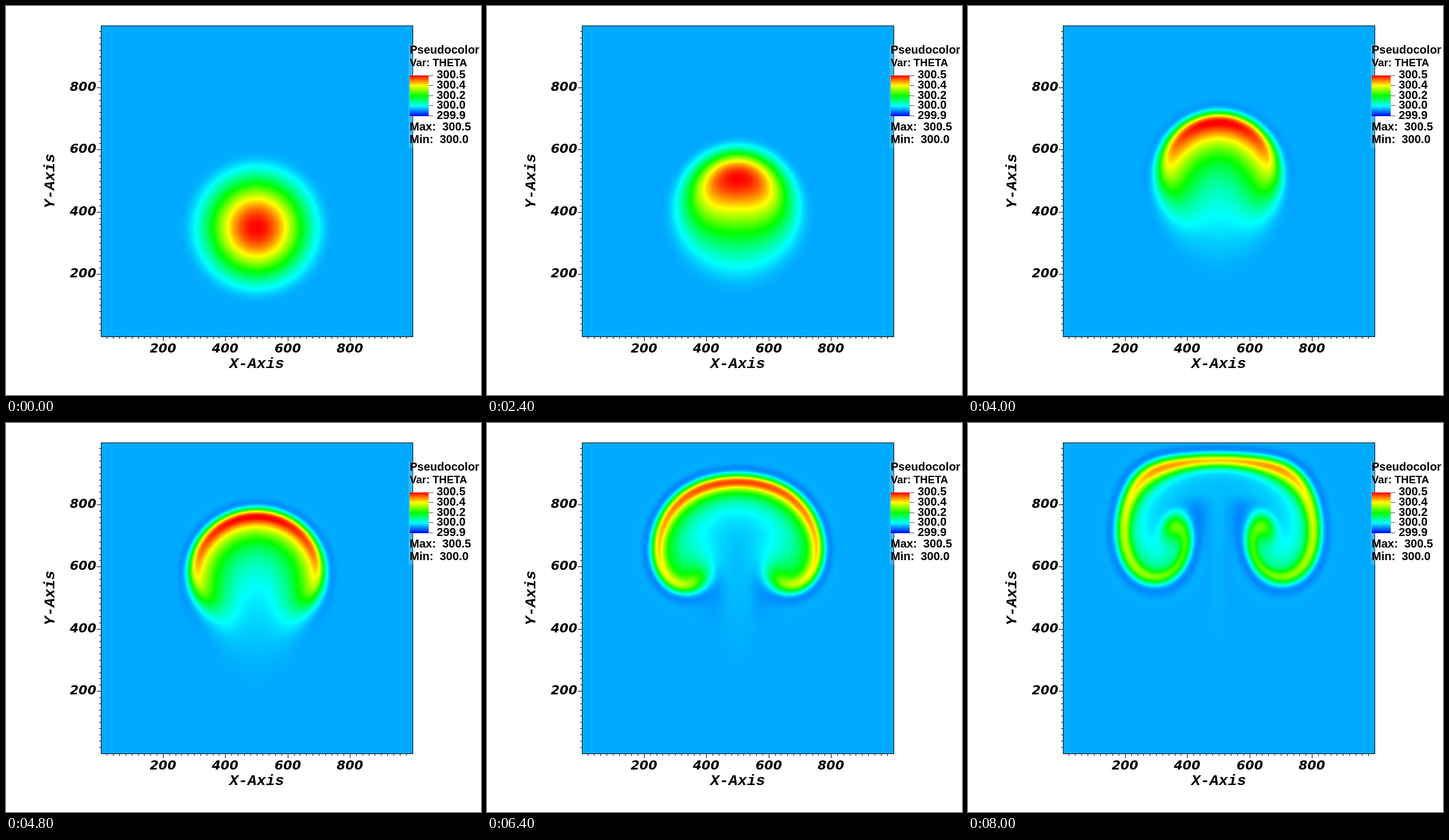
Animation of 826 by 678 pixels, one loop 8.2 s. Source, as an HTML page with a canvas:

```html
<!DOCTYPE html>
<html lang="en">
<head>
<meta charset="utf-8">
<title>Rising thermal bubble</title>
<style>
  html, body { margin: 0; width: 826px; height: 678px; overflow: hidden; background: #fff; }
  canvas { position: absolute; left: 165px; top: 34px; }
  svg { position: absolute; left: 0; top: 0; }
  text { white-space: pre; }
  .num { font: italic bold 22px "DejaVu Sans", sans-serif; }
  .axis { font: italic bold 26.5px "Liberation Mono", monospace; text-anchor: middle; }
  .key { font: bold 20px "Liberation Sans", sans-serif; }
</style>
</head>
<body>
<canvas id="plot" width="542" height="542"></canvas>
<svg id="frame" width="826" height="678">
  <defs>
    <linearGradient id="hot" x2="0" y2="1">
      <stop stop-color="#f00"/><stop offset=".25" stop-color="#ff0"/>
      <stop offset=".5" stop-color="#0f0"/><stop offset=".75" stop-color="#0ff"/>
      <stop offset="1" stop-color="#00f"/>
    </linearGradient>
  </defs>
  <rect x="165.5" y="34.5" width="542" height="542" fill="none" stroke="#000"/>
  <path id="ticks" stroke="#000" fill="none"/>
  <text class="axis" x="436" y="631">X-Axis</text>
  <text class="axis" transform="translate(84 305) rotate(-90)">Y-Axis</text>
  <rect x="700" y="67" width="126" height="180" fill="#fff" fill-opacity=".2"/>
  <rect x="702" y="121" width="33" height="71" fill="url(#hot)"/>
  <path d="M735 121.5h8m-8 17h8m-8 18h8m-8 17h8m-8 18h8" stroke="#555"/>
  <g class="key">
    <text x="702" y="83">Pseudocolor</text>
    <text x="702" y="105" font-size="18.4" style="font-size:18.4px">Var: THETA</text>
    <text x="749" y="125.5">300.5</text>
    <text x="749" y="143.5">300.4</text>
    <text x="749" y="161.5">300.2</text>
    <text x="749" y="179">300.0</text>
    <text x="749" y="197">299.9</text>
    <text x="702" y="217">Max:  300.5</text>
    <text x="702" y="239">Min:  300.0</text>
  </g>
</svg>
<script>
// Axis ticks and numbers
const frameSvg = document.getElementById('frame');
function addNumber(value, x, y, anchor) {
  const t = document.createElementNS('http://www.w3.org/2000/svg', 'text');
  t.setAttribute('class', 'num');
  t.setAttribute('x', x);
  t.setAttribute('y', y);
  t.setAttribute('text-anchor', anchor);
  t.textContent = value;
  frameSvg.append(t);
}
let tickPath = '';
for (let v = 20; v < 1000; v += 20) {
  const major = v % 200 === 0, len = major ? 7 : 3;
  const x = Math.floor(165 + v * .542) + .5, y = Math.floor(576 - v * .542) + .5;
  tickPath += `M${x} 577v${len}M165 ${y}h${-len}`;
  if (major) {
    addNumber(v, x - .5, 604, 'middle');
    addNumber(v, 157, y + 5.5, 'end');
  }
}
document.getElementById('ticks').setAttribute('d', tickPath);

// Boussinesq flow (temperature, vorticity, stream function) on the left half of a
// 1000 m box; the right half is its mirror image. Fields have two ghost cells per side.
const N = 64, M = 128, S = N + 5, H = 500 / N;
const FRAMES = 41, HOLD = 200, STEPS = 8, DT = 700 / (FRAMES - 1) / STEPS;
const BUOYANCY = 9.81 / 300, DAMPING = 70 * DT / 2 / H ** 4;
const at = (i, j) => (j + 2) * S + i + 2;
const field = () => new Float64Array(S * (M + 5));
const theta = field(), omega = field(), psi = field();
const dTheta = field(), dOmega = field(), lapA = field(), lapB = field();

function eachNode(fn) {
  for (let j = 0; j <= M; j++) for (let i = 0; i <= N; i++) fn(at(i, j), i, j);
}

function fold(a, p, step, sign) {
  for (let k = 1; k <= 2; k++) a[p - k * step] = sign * a[p + k * step];
  if (sign < 0) a[p] = 0;
}
function mirror(a, sign) {
  for (let j = 0; j <= M; j++) {
    fold(a, at(0, j), 1, sign);
    fold(a, at(N, j), -1, sign);
  }
  for (let i = -2; i <= N + 2; i++) {
    fold(a, at(i, 0), S, sign);
    fold(a, at(i, M), -S, sign);
  }
}

const slope = (a, p, s) => (8 * (a[p + s] - a[p - s]) - a[p + 2 * s] + a[p - 2 * s]) / (12 * H);

// Poisson equation: sine transform across, tridiagonal sweep upward
const sine = new Float64Array(N * N), hat = new Float64Array(N * (M + 1)), sweep = new Float64Array(M);
for (let k = 0; k < N; k++) for (let i = 0; i < N; i++) sine[k * N + i] = Math.sin(Math.PI * k * i / N);

function sineSum(src, from, k) {
  let sum = 0;
  for (let i = 1; i < N; i++) sum += src[from + i] * sine[k * N + i];
  return sum;
}
function solvePsi() {
  for (let j = 1; j < M; j++)
    for (let k = 1; k < N; k++) hat[j * N + k] = sineSum(omega, at(0, j), k) * 2 / N * H * H;
  for (let k = 1; k < N; k++) {
    const diag = -2 - (Math.PI * k / N) ** 2;
    for (let j = 1; j < M; j++) {
      sweep[j] = 1 / (diag - sweep[j - 1]);
      hat[j * N + k] = (hat[j * N + k] - hat[(j - 1) * N + k]) * sweep[j];
    }
    for (let j = M - 2; j > 0; j--) hat[j * N + k] -= sweep[j] * hat[(j + 1) * N + k];
  }
  for (let j = 1; j < M; j++)
    for (let i = 1; i < N; i++) psi[at(i, j)] = sineSum(hat, j * N, i);
  mirror(psi, -1);
}

function tendencies() {
  solvePsi();
  for (let j = 0; j <= M; j++) for (let p = at(0, j), end = p + N; p <= end; p++) {
    const u = -slope(psi, p, S), w = slope(psi, p, 1), tx = slope(theta, p, 1);
    dTheta[p] = -u * tx - w * slope(theta, p, S);
    dOmega[p] = BUOYANCY * tx - u * slope(omega, p, 1) - w * slope(omega, p, S);
  }
}

function laplacian(src, out) {
  eachNode(p => { out[p] = src[p - 1] + src[p + 1] + src[p - S] + src[p + S] - 4 * src[p]; });
}
function damp(a, sign) {
  for (let pass = 0; pass < 2; pass++) {
    laplacian(a, lapA);
    mirror(lapA, sign);
    laplacian(lapA, lapB);
    eachNode(p => { a[p] -= DAMPING * lapB[p]; });
    mirror(a, sign);
  }
}

function step() {
  const theta0 = theta.slice(), omega0 = omega.slice();
  for (const keep of [0, 3 / 4, 1 / 3]) {
    tendencies();
    eachNode(p => {
      theta[p] = keep * theta0[p] + (1 - keep) * (theta[p] + DT * dTheta[p]);
      omega[p] = keep * omega0[p] + (1 - keep) * (omega[p] + DT * dOmega[p]);
    });
    mirror(theta, 1);
    mirror(omega, -1);
  }
  damp(theta, 1);
  damp(omega, -1);
}

eachNode((p, i, j) => {
  const r = Math.min(1, Math.hypot(i * H - 500, j * H - 350) / 250);
  theta[p] = .25 * (1 + Math.cos(Math.PI * r));
});
mirror(theta, 1);
const history = [theta.slice()];

function stateAt(n) {
  while (history.length <= n) {
    for (let s = 0; s < STEPS; s++) step();
    history.push(theta.slice());
  }
  return history[n];
}

// Drawing with smooth cubic interpolation
const SIZE = 542, HALF = SIZE / 2;
const ctx = document.getElementById('plot').getContext('2d');
const image = ctx.createImageData(SIZE, SIZE), line = new Float64Array(S);
image.data.fill(255);

function taps(pos) {
  const cell = Math.floor(pos), f = pos - cell;
  return [cell, f * (-.5 + f * (1 - .5 * f)), 1 + f * f * (1.5 * f - 2.5),
    f * (.5 + f * (2 - 1.5 * f)), f * f * (.5 * f - .5)];
}
const columns = Array.from({ length: HALF }, (_, c) => taps((c + .5) / SIZE * M));

function paint(a) {
  const px = image.data;
  for (let row = 0; row < SIZE; row++) {
    const [j, a0, a1, a2, a3] = taps((SIZE - row - .5) / SIZE * M);
    for (let i = 0, p = (j + 1) * S; i < S; i++, p++)
      line[i] = a0 * a[p] + a1 * a[p + S] + a2 * a[p + 2 * S] + a3 * a[p + 3 * S];
    for (let c = 0; c < HALF; c++) {
      const [i, b0, b1, b2, b3] = columns[c];
      const value = b0 * line[i + 1] + b1 * line[i + 2] + b2 * line[i + 3] + b3 * line[i + 4];
      const f = 4 * Math.min(1, Math.max(0, (value + .1) / .6));
      const left = (row * SIZE + c) * 4, right = (row * SIZE + SIZE - 1 - c) * 4;
      px[left] = px[right] = 255 * (f - 2);
      px[left + 1] = px[right + 1] = 255 * Math.min(f, 4 - f);
      px[left + 2] = px[right + 2] = 255 * (2 - f);
    }
  }
  ctx.putImageData(image, 0, 0);
}

let shown = -1;
const start = performance.now();
function tick() {
  const n = Math.floor((performance.now() - start) / HOLD) % FRAMES;
  if (n !== shown) paint(stateAt(shown = n));
  requestAnimationFrame(tick);
}
tick();
</script>
</body>
</html>
```
